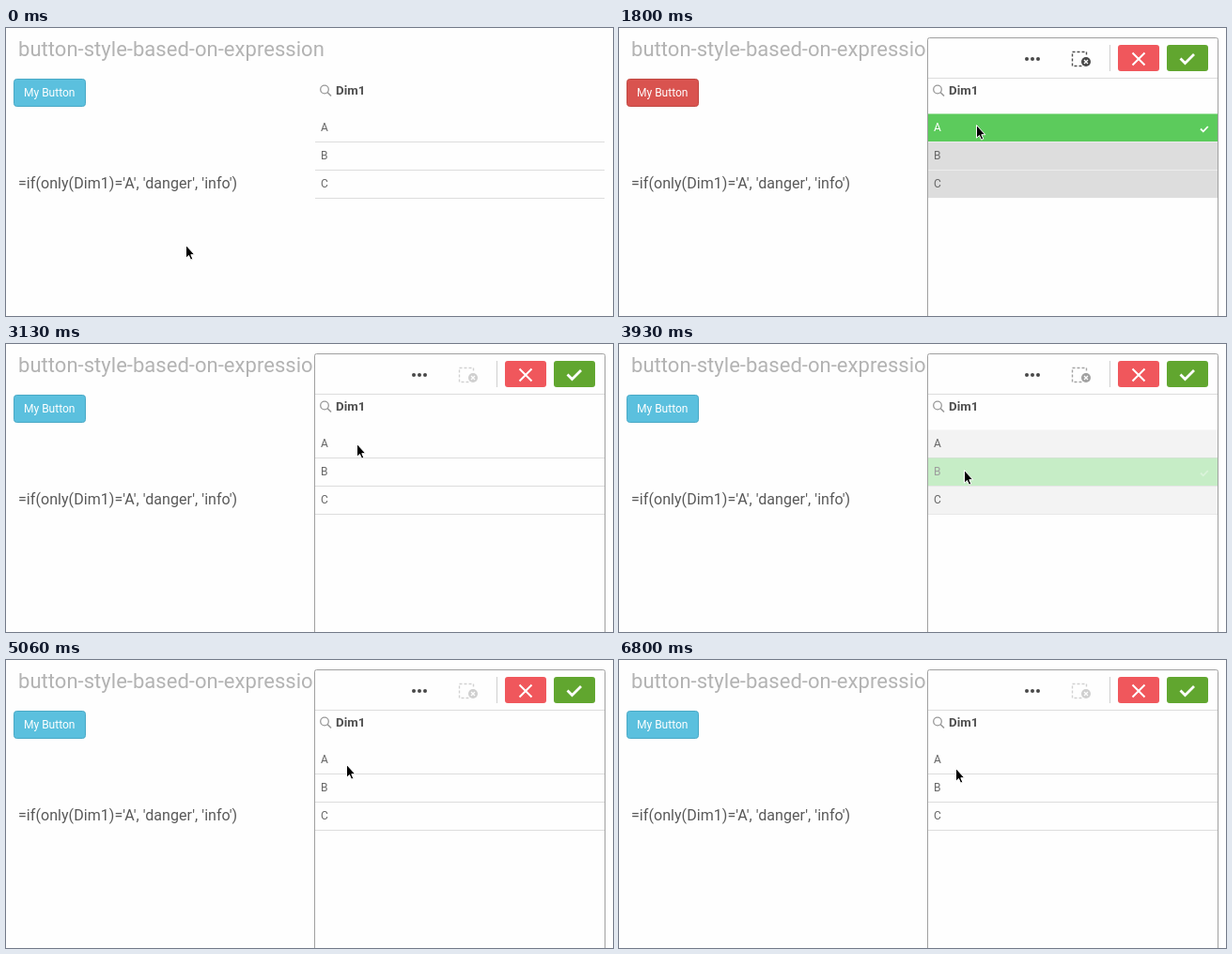
An HTML page that plays this animation: 646x307 px, repeating every 6.83 s.

```html
<!DOCTYPE html>
<html lang="en">
<head>
<meta charset="utf-8">
<title>Button style based on expression</title>
<style>
  html, body { margin: 0; width: 100%; height: 100%; overflow: hidden; background: #fefefe; }
  svg { display: block; font: 12px Roboto, "Open Sans", sans-serif; fill: #595959; }
  .line { fill: none; stroke-linecap: butt; }
</style>
</head>
<body>
<svg width="646" height="307" viewBox="0 0 646 307">
  <text x="13" y="30" font-size="22" letter-spacing="0.035" fill="#b3b3b3">button-style-based-on-expression</text>
  <rect id="button" x="8.5" y="54.5" width="76" height="29" rx="3"/>
  <text x="19" y="73" fill="#fff">My Button</text>
  <text x="13" y="171" font-size="16" letter-spacing="0.06">=if(only(Dim1)='A', 'danger', 'info')</text>

  <g id="panel">
    <rect x="328.5" y="10.5" width="309" height="310" rx="2" fill="#fefefe" stroke="#a0a0a0"/>
    <path class="line" d="M329 53.5H637" stroke="#ddd"/>
    <path class="line" d="M522.5 18V46" stroke="#d0d0d0"/>
    <g fill="#484848">
      <circle cx="434" cy="33" r="2"/><circle cx="440" cy="33" r="2"/><circle cx="446" cy="33" r="2"/>
    </g>
    <g id="clear">
      <rect class="line" x="482.5" y="25.5" width="15" height="15" stroke="#505050" stroke-width="1.4" stroke-dasharray="3 2"/>
      <circle cx="497" cy="36" r="6" fill="#fefefe"/>
      <circle cx="497" cy="36" r="5" fill="#484848"/>
      <path class="line" d="M495 34l4 4m0-4l-4 4" stroke="#fff" stroke-width="1.3"/>
    </g>
    <rect x="531" y="18" width="44" height="28" rx="3" fill="#f0575c"/>
    <path class="line" d="M546.5 26.5l13 13m0-13l-13 13" stroke="#fff" stroke-width="2"/>
    <rect x="583" y="18" width="44" height="28" rx="3" fill="#61a62f"/>
    <path class="line" d="M597.5 32.5l5 5 9.5-9.5" stroke="#fff" stroke-width="2.8"/>
  </g>

  <circle class="line" cx="339" cy="65.5" r="4.3" stroke="#999" stroke-width="1.3"/>
  <path class="line" d="M342 68.5l4 4" stroke="#999" stroke-width="1.6"/>
  <text x="351" y="71" font-size="13.3" font-weight="700" fill="#505050">Dim1</text>
  <g id="rows"></g>

  <g id="expand">
    <circle cx="609" cy="41" r="18.2" fill="#fefefe" stroke="#555" stroke-width="2"/>
    <path d="M611 33h6v6z M601 43v6h6z" fill="#505050"/>
    <path class="line" d="M611.5 38.5l3-3M606.5 43.5l-3 3" stroke="#505050" stroke-width="2"/>
  </g>
  <path id="cursor" d="M.5 .5V14.2L3.5 11.5 5.6 16.2 7.8 15.2 5.8 10.7H9.8Z" fill="#000" stroke="#fff" stroke-width="1"/>
</svg>
<script>
const LOOP = 6830, STEP = 200 / 3;
const $ = id => document.getElementById(id);

// Cursor stops: time, x, y
const path = [
  [600, 191, 231], [1333, 395, 97], [1466, 380, 103], [2400, 380, 103], [2600, 373, 106],
  [3270, 373, 106], [3660, 367, 134], [4800, 367, 134], [5060, 362, 111],
  [5140, 362, 111], [5330, 362, 106], [6530, 362, 106], [6800, 358, 115]
];
// Selections: on, off, row
const picks = [[1660, 2930, 0], [3930, 4730, 1], [5660, 6460, 0]];

const clamp = v => Math.max(0, Math.min(1, v));
const ramp = (t, start) => clamp((t - start + STEP) / (3 * STEP));
const ease = u => u * u * (3 - 2 * u);
const set = (el, attrs) => { for (const k in attrs) el.setAttribute(k, attrs[k]); };

$('rows').innerHTML = ['A', 'B', 'C'].map((name, i) => `
  <g transform="translate(0 ${91 + 30 * i})">
    <rect x="329" y="30" width="308" height="1"/>
    <rect x="329" y="0.5" width="308" height="29.5"/>
    <text x="335" y="19">${name}</text>
    <path class="line" d="M619 16.5l2.8 2.8 5-5.3" stroke="#fff" stroke-width="1.8"/>
  </g>`).join('');
const rows = [...$('rows').children].map(g => [...g.children]);

function cursorAt(t) {
  const i = path.findIndex(p => p[0] > t);
  if (i === 0) return path[0].slice(1);
  if (i < 0) return path[path.length - 1].slice(1);
  const a = path[i - 1], b = path[i];
  const u = ease((t - a[0]) / (b[0] - a[0]));
  return [a[1] + (b[1] - a[1]) * u, a[2] + (b[2] - a[2]) * u];
}

function draw(t) {
  const [x, y] = cursorAt(t);
  set($('cursor'), { transform: `translate(${x} ${y})` });

  const pick = picks.filter(p => t >= p[0] - 5).pop();
  const level = pick ? ramp(t, pick[0]) - ramp(t, pick[1]) : 0;
  const danger = pick && pick[2] === 0 && t >= pick[0] + 130 && t < pick[1] + 130;
  set($('button'), danger ? { fill: '#d9534f', stroke: '#c04842' } : { fill: '#5bc0de', stroke: '#4aa9c6' });

  const open = t < 1655 ? 0 : ramp(t, 1660);
  set($('panel'), { opacity: open });
  set($('clear'), { opacity: 0.25 + 0.75 * level });
  set($('expand'), { opacity: t < 1655 ? ramp(t, 1130) : 0 });

  rows.forEach(([rule, fill, label, tick], i) => {
    const on = pick && pick[2] === i;
    const ink = 104 + (on ? 151 * level : 0);
    const edge = 221 + 30 * level;
    set(rule, { fill: `rgb(${edge},${edge},${edge})` });
    set(fill, { fill: on ? '#5ccb5c' : '#dddddd', opacity: level });
    set(label, { fill: `rgb(${ink},${ink},${ink})` });
    set(tick, { opacity: on ? level : 0 });
  });
}

function frame() {
  const t = performance.now() % LOOP;
  draw(Math.floor((t + 7) / STEP) * STEP);
  requestAnimationFrame(frame);
}
frame();
</script>
</body>
</html>
```
